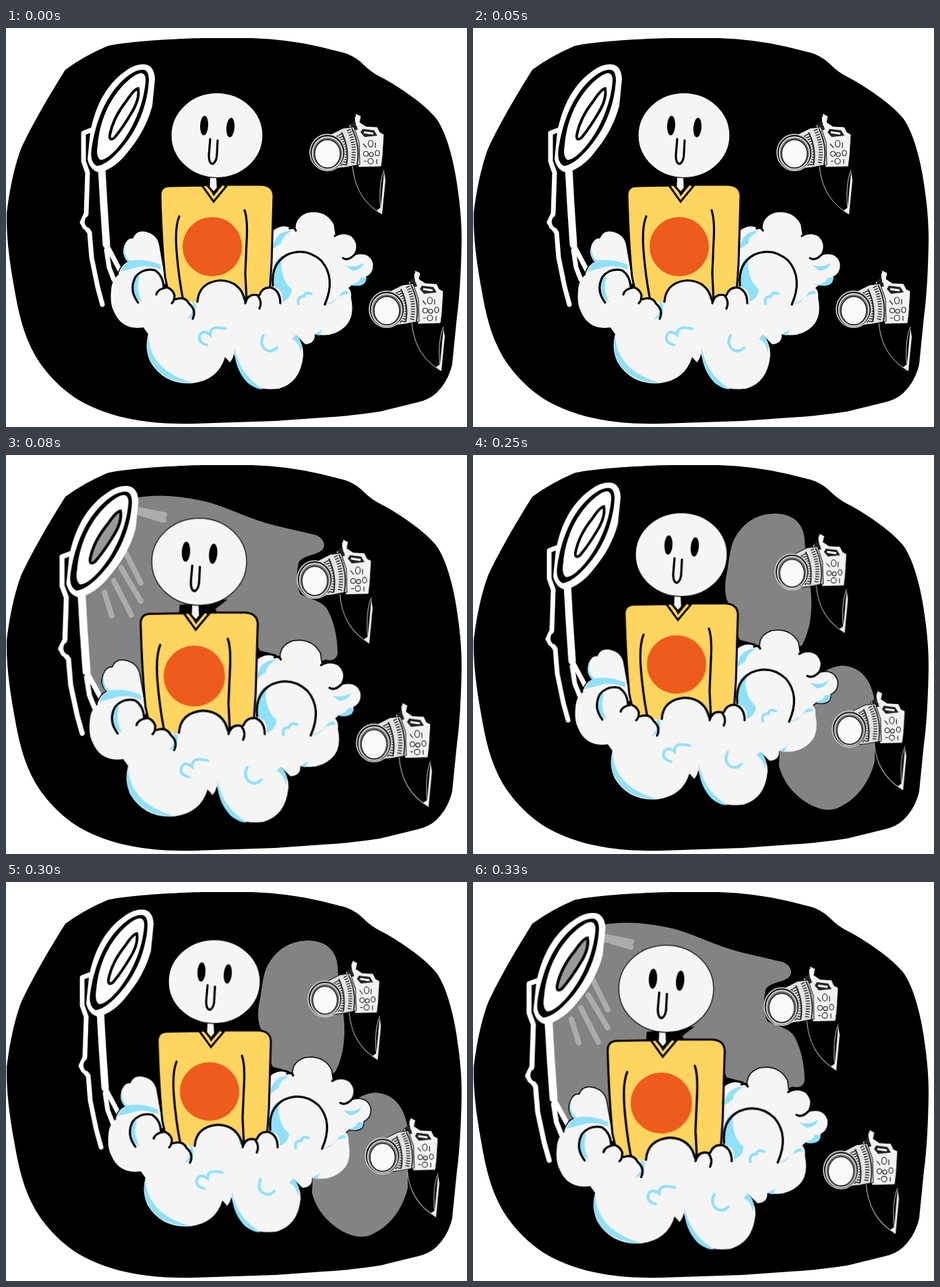
Write an HTML page that moves like this. It is 684 by 593 pixels and loops after 0.41 s.

```html
<!DOCTYPE html>
<html lang="en">
<head>
<meta charset="utf-8">
<title>Photo shoot</title>
<style>
html, body { margin: 0; width: 100%; height: 100%; overflow: hidden; background: #fff; }
svg { display: block; width: 684px; height: 593px; }
.line { fill: none; stroke: #000; stroke-width: 3.2; stroke-linecap: round; stroke-linejoin: round; }
.cloud { fill: #f5f5f5; }
.rear { stroke: #000; stroke-width: 1.5; stroke-linejoin: round; }
.blue { fill: #8fe0fb; }
.swirl { fill: none; stroke: #8fe0fb; stroke-width: 4; stroke-linecap: round; }
.grey { fill: #838383; }
.edge { fill: none; stroke: #fff; stroke-linejoin: round; stroke-linecap: round; }
</style>
</head>
<body>
<svg viewBox="0 0 684 593">
  <defs>
    <g id="camera">
      <!-- strap -->
      <path d="M514 203C516 234 529 260 557 276C554 258 553 230 561 211" fill="#000" stroke="#ccc" stroke-width="1"/>
      <path d="M561 213L563 226L558 277L550 271L556 267Z" fill="#eee"/>
      <!-- body -->
      <path d="M519 127L527 131L525 140L534 146L551 147L555 155L561 158L559 190L557 206L523 207L516 165L509 145L517 139Z" fill="#f2f2f2" stroke="#000" stroke-width="1"/>
      <path d="M511 143L518 138L522 151L512 153ZM529 150L546 152L551 160L532 162L526 155Z" fill="#222"/>
      <path d="M531 155L545 157M519 132L521 145" stroke="#fff" stroke-width="3"/>
      <g fill="#fff" stroke="#222" stroke-width="1.2">
        <ellipse cx="541" cy="172" rx="3.5" ry="5"/>
        <ellipse cx="551" cy="186" rx="3" ry="4"/>
        <circle cx="534" cy="187" r="3.5"/>
        <circle cx="542" cy="188" r="3"/>
        <circle cx="541" cy="198" r="4"/>
        <path d="M530 172L535 178M548 170V178M531 198H535M550 195V202"/>
      </g>
      <!-- barrel -->
      <path d="M482 158L500 149L516 147L524 170L525 203L504 207L486 209Z" fill="#e4e4e4" stroke="#000"/>
      <path d="M491 160Q503 180 497 205M498 155Q510 180 505 204M513 149Q526 175 521 203" fill="none" stroke="#222" stroke-width="2"/>
      <path d="M495 158Q507 180 501 204M508 151Q520 175 514 203" fill="none" stroke="#333" stroke-width="6" stroke-dasharray="1.6 2.2"/>
      <!-- lens -->
      <ellipse cx="477" cy="185" rx="26" ry="27" fill="#1a1a1a" stroke="#ddd" stroke-width="1.5"/>
      <ellipse cx="477" cy="186" rx="22.5" ry="24" fill="#777" stroke="#fff" stroke-width="1.3"/>
      <ellipse cx="477" cy="187" rx="19" ry="21" fill="#fafafa" stroke="#111" stroke-width="1.4"/>
    </g>
  </defs>

  <path d="M150 27C175 20 260 15 300 15H365Q420 17 466 28L502 37Q518 42 530 54Q542 66 556 73C582 86 622 114 638 134C656 158 667 210 671 245Q676 280 676 315Q675 385 669 430L662 500Q656 526 638 543Q628 552 612 556L555 570Q510 577 470 579L400 584L280 588Q225 589 190 582C160 577 130 566 108 553C82 537 59 513 44 488C25 455 18 420 12 385Q0 320 1 275C6 235 13 205 22 180C36 150 55 115 88 62Q115 42 150 27Z"/>

  <g id="beam">
    <path class="grey" d="M190 64Q235 55 296 69C330 78 365 97 400 105L460 119Q473 125 472 135C470 150 442 146 434 160Q428 190 437 207C450 214 473 217 479 234C488 252 492 275 492 295Q490 308 474 304L400 340L160 350L132 357Q120 346 120 320L117 225L105 210Z"/>
    <path d="M192 84L234 97M195 81L235 89M171 168L200 217M160 187L186 238M146 204L157 239M178 146L200 190" stroke="#b4b4b4" stroke-width="8" stroke-linecap="round" opacity=".85"/>
  </g>

  <g id="flash">
    <path class="grey" d="M447 87C478 87 491 105 492 126C493 145 498 170 501 200Q506 250 488 283L420 305L392 282Q394 240 386 228Q371 217 375 184C380 162 380 140 388 124Q408 88 447 87Z"/>
    <path class="grey" d="M548 313C580 315 593 340 597 372L596 455C589 485 570 510 548 521Q530 533 505 522C480 510 461 489 454 462L455 440L490 380L500 348Q517 315 548 313Z"/>
  </g>

  <g id="lamp">
    <path d="M127 150L140 210L150 330L166 362L157 382L143 412L122 305L116 205Z"/>
    <g class="edge">
      <path d="M131 150L115 156V198L121 215L119 276L113 289L124 304L127 341L136 385L143 411" stroke-width="7"/>
      <path d="M142 208L145 262L149 322" stroke-width="11"/>
      <path d="M149 322L169 360M149 330L153 356L160 374" stroke-width="7"/>
    </g>
    <path d="M116 282Q107 287 114 298L123 304L126 284Z" fill="#fff"/>
    <path d="M119 281Q114 289 120 296L128 299V279Z"/>
    <path d="M205 54Q220 55 221 76L217 116C208 148 194 168 181 184Q163 208 139 215Q125 212 121 195L125 155C133 114 150 82 180 62Q193 53 205 54Z" fill="#fff"/>
    <path d="M203 62Q212 62 212 78C210 116 194 153 172 178Q151 203 135 205Q124 200 127 179C133 140 147 102 174 77Q190 62 203 62Z"/>
    <path d="M201 67Q208 68 207 80C204 114 189 149 169 174Q151 196 140 196Q133 191 136 174C139 139 153 105 178 81Q193 67 201 67Z" fill="#fff"/>
    <path id="slit" d="M196 90Q199 106 185 128Q174 147 161 163Q153 169 154 159Q159 133 179 108Q190 91 196 90Z" fill="#fff" stroke="#000" stroke-width="4"/>
  </g>

  <g id="hero">
    <!-- dark gaps behind neck and cloud -->
    <path d="M285 222L354 214L336 228L342 237H284ZM394 276L400 288L424 294L420 308H390Z"/>

    <!-- rear cloud -->
    <path class="cloud rear" d="M166 365Q171 351 180 347Q169 336 176 321Q180 311 188 312Q193 299 207 302Q225 306 228 323L238 380L190 400Z"/>
    <path class="blue" d="M177 319Q173 338 184 346Q206 342 229 352L230 359Q207 350 189 357L170 362Q174 352 181 348Q170 338 177 319Z"/>
    <path class="cloud rear" d="M390 306Q406 289 421 296L429 299Q428 281 447 274Q475 269 487 292L489 306Q507 300 519 313Q526 326 517 337Q539 331 545 349Q547 364 535 370Q536 387 513 383L470 420L385 390Z"/>
    <path class="blue" d="M396 325Q400 306 416 302L424 301Q408 311 409 319L397 328ZM504 353Q520 357 530 349Q530 358 514 361ZM535 371Q533 386 512 382L503 382Q524 381 526 371Z"/>
    <path class="line" d="M421 298Q428 295 430 301M488 309Q501 301 514 309Q526 321 518 336Q508 347 500 342" stroke-width="2"/>

    <!-- neck and shirt -->
    <path d="M302 218H313L314 238L308 246L301 237Z" fill="#f5f5f5" stroke="#000" stroke-width="2.5"/>
    <path d="M229 249Q229 236 241 235L291 234L308 256L326 233L379 233Q396 234 397 249L394 350L390 410H245L236 370Q231 320 229 249Z" fill="#ffd45f" stroke="#000" stroke-width="3"/>
    <path d="M291 234L298 233L308 245L321 232L327 235L308 258Z" fill="#ffd45f" stroke="#000" stroke-width="3"/>
    <path d="M301 235L308 250L321 234L314 236L308 243Z"/>
    <path class="line" d="M257 280C250 297 252 325 255 352Q258 380 263 405M354 271Q359 285 357 318L355 365L357 404"/>
    <circle cx="306" cy="325" r="44" fill="#ed5b1d"/>

    <!-- head -->
    <ellipse cx="313" cy="159.500" rx="68" ry="63" fill="#f5f5f5" stroke="#000" stroke-width="1.2"/>
    <ellipse cx="294" cy="145" rx="6" ry="14.500" transform="rotate(3 294 145)"/>
    <ellipse cx="333" cy="148" rx="6" ry="14.500" transform="rotate(5 333 148)"/>
    <path class="line" d="M303 165L301 189Q301 202 307 202Q313 198 313 186L314 167"/>

    <!-- front cloud -->
    <path class="cloud" d="M156 390Q157 367 178 362L194 366Q202 357 217 359Q233 365 234 384Q248 385 251 403Q263 398 271 406L283 408Q286 377 318 374Q350 376 355 407Q360 393 374 397Q380 382 395 386Q394 350 415 337Q435 327 457 336Q482 350 481 386L498 381Q514 385 512 401Q518 430 503 444Q485 461 458 455Q459 469 444 470L430 456Q442 470 441 487Q437 527 405 536Q365 541 348 513L338 484Q337 492 332 497Q329 493 325 489Q315 523 277 528Q235 531 214 496Q205 476 211 455L204 445Q172 450 160 421Q154 410 156 390Z"/>
    <path class="blue" d="M211 456Q205 483 219 502Q238 528 279 528Q248 519 232 504Q212 485 211 456ZM339 475Q338 505 358 527Q370 537 382 537Q361 524 351 507Q342 491 339 475ZM396 359Q394 375 399 386Q412 388 410 407Q423 402 424 388Q410 378 408 352Q409 340 418 336Q399 341 396 359ZM471 411Q490 407 498 393Q506 387 509 395Q497 395 490 403Q484 411 471 411ZM430 456Q442 467 437 482Q435 467 424 462ZM194 365Q186 378 189 391Q190 402 202 407Q192 388 198 371ZM276 405Q281 422 268 433Q284 428 282 411ZM347 383Q354 395 355 408L350 402ZM458 455L470 448L465 457Z"/>
    <path class="swirl" d="M298 471Q285 468 287 458Q291 447 303 456Q302 441 325 447M382 457Q376 469 384 477Q393 484 402 475M434 410Q431 399 442 399Q444 391 453 395"/>
    <path class="line" d="M196 408Q182 390 192 370Q203 356 221 360Q233 368 234 385Q246 385 250 397Q250 406 246 409M237 386Q225 388 223 396M252 403Q266 398 272 410Q283 420 277 432M284 407Q286 378 318 375Q348 376 355 406M355 409Q359 394 373 397Q381 407 376 417M376 397Q381 384 394 386Q407 391 407 409M396 383Q393 350 417 337Q445 325 468 346Q490 372 473 411"/>
  </g>

  <g id="cam1"><use href="#camera"/></g>
  <g id="cam2"><use href="#camera" transform="translate(88 233)"/></g>
</svg>
<script>
const loop = 410;
const starts = [0, 80, 250, 330, loop];
const still = [1, 1, 0, 0];

// Scale x, scale y, shift x, shift y: rest, lit and camera-flash poses.
const poses = {
  lamp: [still, [1.07, 1.03, -40, -9.6], [1, 0.989, -2, -12.4]],
  hero: [still, [1.034, 1.027, -37, -5.2], [1, 0.987, -4, -9.4]],
  cam1: [still, [1, 1.035, -19, -6.5], [0.965, 0.987, 13, -9]],
  cam2: [still, [1, 1.034, -19, -4.3], [0.98, 0.987, 5, -5.3]]
};
const order = [0, 1, 2, 1, 1];

function play(id, prop, values) {
  const frames = order.map((pose, i) => ({
    [prop]: values[pose], offset: starts[i] / loop, easing: 'steps(1, end)'
  }));
  const anim = document.getElementById(id).animate(frames, { duration: loop, iterations: Infinity });
  anim.startTime = document.timeline.currentTime;
}

for (const [id, list] of Object.entries(poses)) {
  play(id, 'transform', list.map(([sx, sy, x, y]) => `matrix(${sx}, 0, 0, ${sy}, ${x}, ${y})`));
}
play('beam', 'opacity', [0, 1, 0]);
play('flash', 'opacity', [0, 0, 1]);
play('slit', 'fill', ['#fff', '#999', '#fff']);
</script>
</body>
</html>
```
